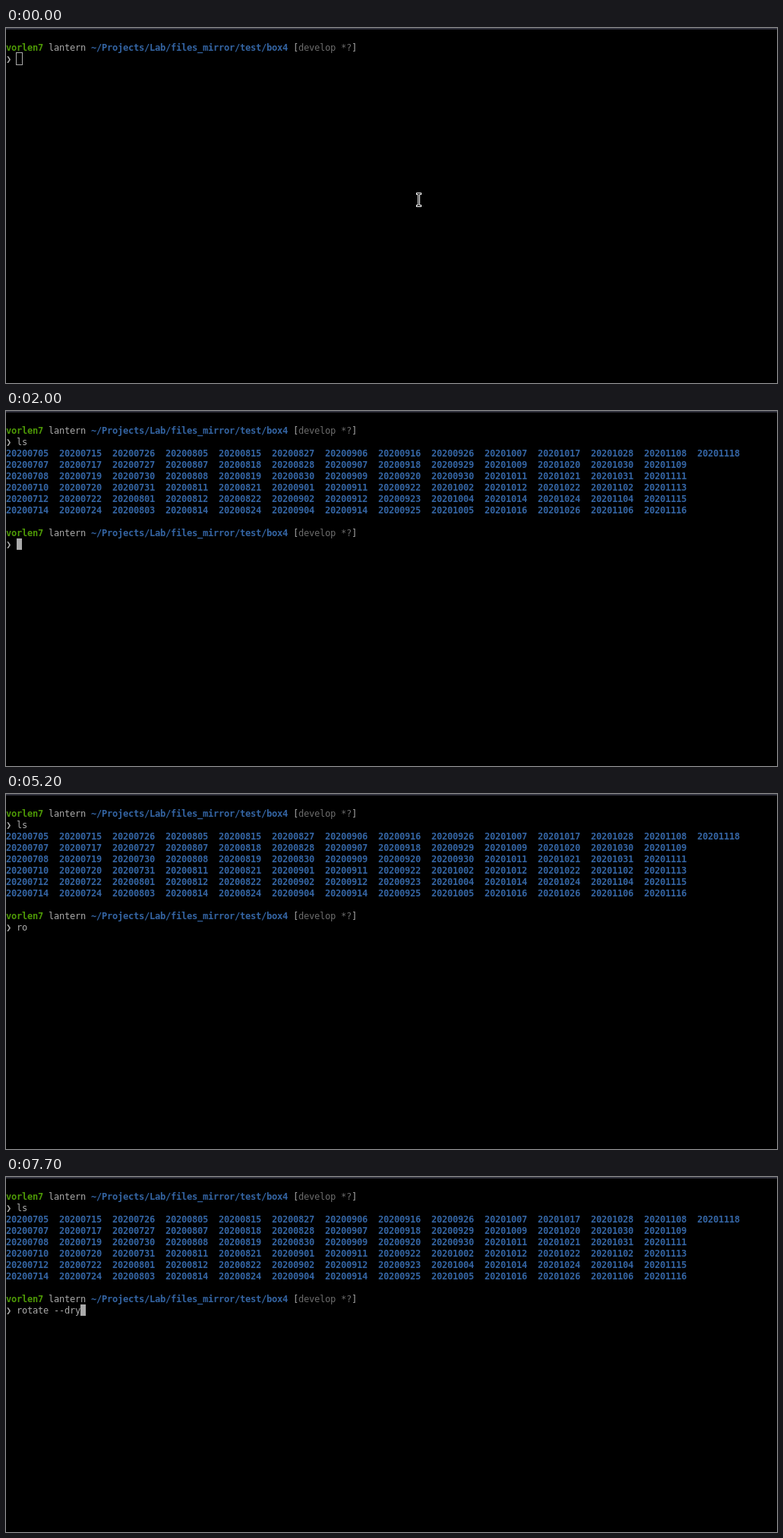
Write an HTML page with a canvas that moves like this. It is 1015 by 468 pixels and loops after 8000 ms.

```html
<!DOCTYPE html>
<html lang="en">
<head>
<meta charset="utf-8">
<title>Terminal session</title>
<style>
  html, body { margin: 0; width: 100%; height: 100%; overflow: hidden; background: #000; }
  canvas { display: block; }
</style>
</head>
<body>
<canvas id="screen" width="1015" height="468"></canvas>
<script>
const ctx = document.getElementById('screen').getContext('2d', { alpha: false });
const LOOP = 8000, CELL = 7, LINE = 15, TOP = 3;
const FG = '#aaaaaa', GREEN = '#4e9a06', BLUE = '#3465a4', GREY = '#6c6c6c';
const FOCUS = 300, ENTER = 2000, BLINK = 600, ECHO_DELAY = 100;

// Characters arrive in bursts with an even gap.
function burst(text, start, gap = 100) {
  return [...text].map((char, i) => ({ char, time: start + i * gap, press: start - ECHO_DELAY }));
}
const list = burst('ls', 1400);
const rotate = [
  burst('ro', 4500), burst('ta', 5400), burst('te', 5700),
  burst(' --', 6300, 200), burst('dr', 7000, 300), burst('y', 7700)
].flat();
const firstPress = list[0].press;

// Every key press or echoed character makes the cursor solid again.
const wakeTimes = [FOCUS, ENTER - ECHO_DELAY,
  ...[...list, ...rotate].flatMap(key => [key.press, key.time])];

// Backup folders: nearly even steps through the season, slightly shuffled.
const FOLDERS = 79, SPAN = 136, ROWS = 6;
const folders = Array.from({ length: FOLDERS }, (_, i) => {
  const jitter = 0.35 * (1 + Math.sin(i * i));
  const day = Math.floor(i * SPAN / (FOLDERS - 1) + jitter);
  return new Date(Date.UTC(2020, 6, 5 + day)).toISOString().slice(0, 10).replace(/-/g, '');
});

function rect(color, x, y, w, h) {
  ctx.fillStyle = color;
  ctx.fillRect(x, y, w, h);
}

function write(text, col, row, color, bold) {
  ctx.font = (bold ? 'bold ' : '') + '12px "DejaVu Sans Mono", monospace';
  ctx.fillStyle = color;
  [...text].forEach((char, i) => {
    if (char !== ' ') ctx.fillText(char, (col + i) * CELL, TOP + row * LINE + 12);
  });
}

function prompt(row) {
  write('vorlen7', 0, row, GREEN, true);
  write('lantern', 8, row, FG);
  write('~/Projects/Lab/files_mirror/test/box4', 16, row, BLUE, true);
  write('[', 54, row, FG);
  write('develop *?', 55, row, GREY);
  write(']', 65, row, FG);
  write('❯', 0, row + 1, FG);
}

function typed(keys, t) {
  return keys.filter(key => key.time <= t).map(key => key.char).join('');
}

function cursor(col, row, t) {
  const x = col * CELL, y = TOP + row * LINE;
  if (t < FOCUS) {
    ctx.strokeStyle = FG;
    ctx.lineWidth = 1;
    ctx.strokeRect(x - 0.5, y - 0.5, CELL + 1, LINE + 1);
    return;
  }
  const wake = Math.max(...wakeTimes.filter(time => time <= t));
  if (Math.floor((t - wake) / BLINK) % 2 === 0) rect(FG, x, y, CELL, LINE);
}

// White I-beam with a thin dark core.
function pointer(x, y) {
  for (const [color, inset] of [['#fff', 0], ['#000', 1]]) {
    const part = (dx, dy, w, h) =>
      rect(color, x + dx + inset, y + dy + inset, w - 2 * inset, h - 2 * inset);
    part(0, 0, 7, 3);
    part(2, 0, 3, 19);
    part(0, 16, 7, 3);
  }
}

function draw(t) {
  rect('#000', 0, 0, 1015, 468);
  rect('#2f303b', 0, 0, 1015, 2);
  prompt(1);
  const done = t >= ENTER;
  const listing = typed(list, t), command = typed(rotate, t);
  write(listing, 2, 2, FG);
  if (done) {
    folders.forEach((name, i) =>
      write(name, Math.floor(i / ROWS) * 10, 3 + i % ROWS, BLUE, true));
    prompt(10);
    write(command, 2, 11, FG);
  }
  cursor(2 + (done ? command : listing).length, done ? 11 : 2, t);
  if (t < firstPress) pointer(540, 217);
}

const start = performance.now();
function tick() {
  draw((performance.now() - start) % LOOP);
  requestAnimationFrame(tick);
}
tick();
</script>
</body>
</html>
```
